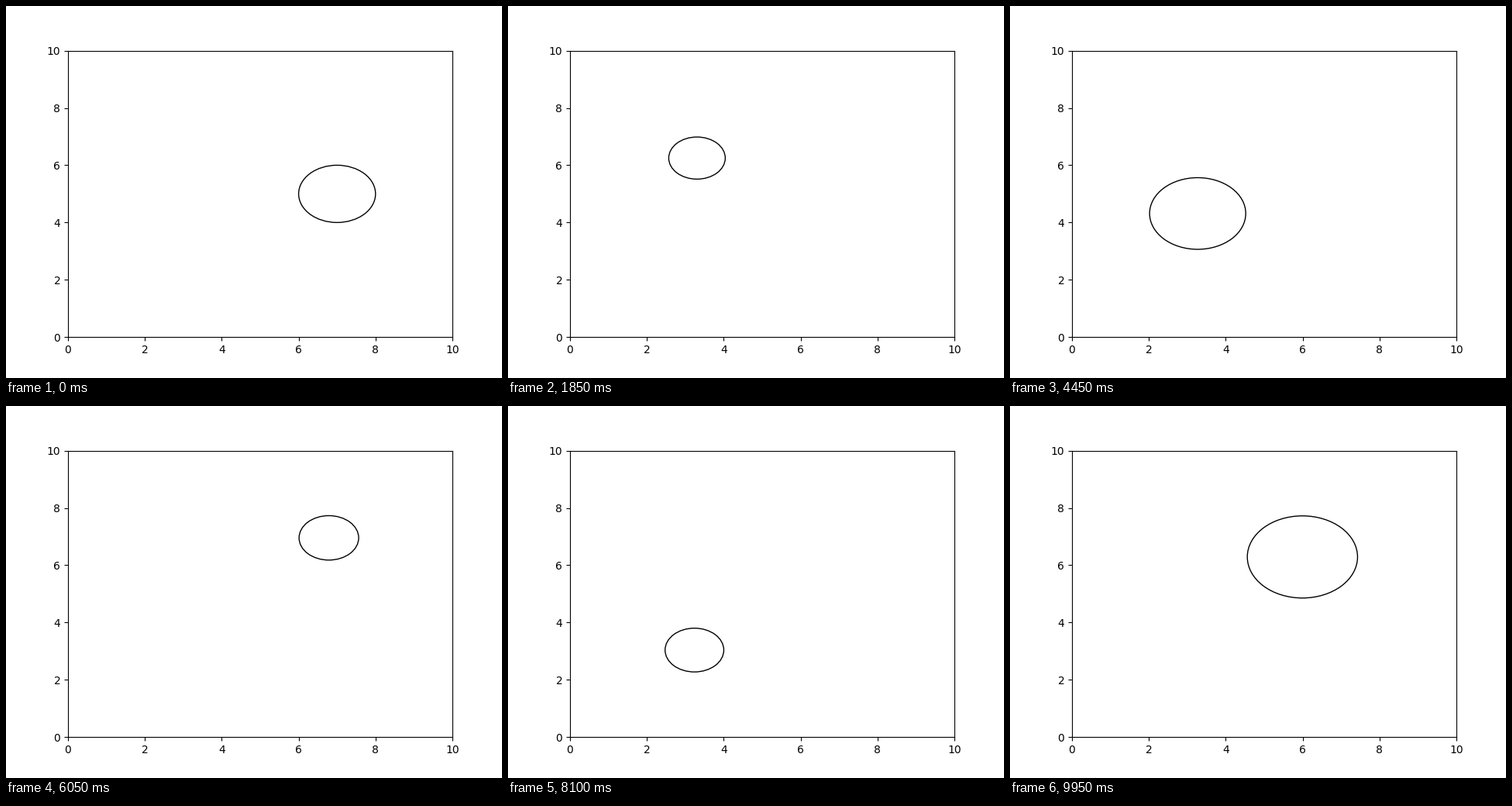
Write a matplotlib script that moves like this. It is 640 by 480 pixels and loops after 10000 ms.

```python
import numpy as np
import matplotlib.pyplot as plt
from matplotlib.animation import FuncAnimation

FRAMES = 200
INTERVAL = 50  # ms
STEP = 0.1     # phase advance per frame

fig, ax = plt.subplots(figsize=(6.4, 4.8), dpi=100)
ax.set_xlim(0, 10)
ax.set_ylim(0, 10)

circle = plt.Circle((7, 5), 1, fill=False, edgecolor="black", linewidth=1)
ax.add_patch(circle)


def update(frame):
    """Move the circle along a Lissajous path while its radius pulses."""
    t = frame * STEP
    circle.center = 5 + 2 * np.cos(t), 5 + 2 * np.sin(2 * t / 3)
    circle.radius = 1 + 0.5 * np.sin(t)
    return (circle,)


anim = FuncAnimation(fig, update, frames=FRAMES, interval=INTERVAL, repeat=True)
plt.show()
```
